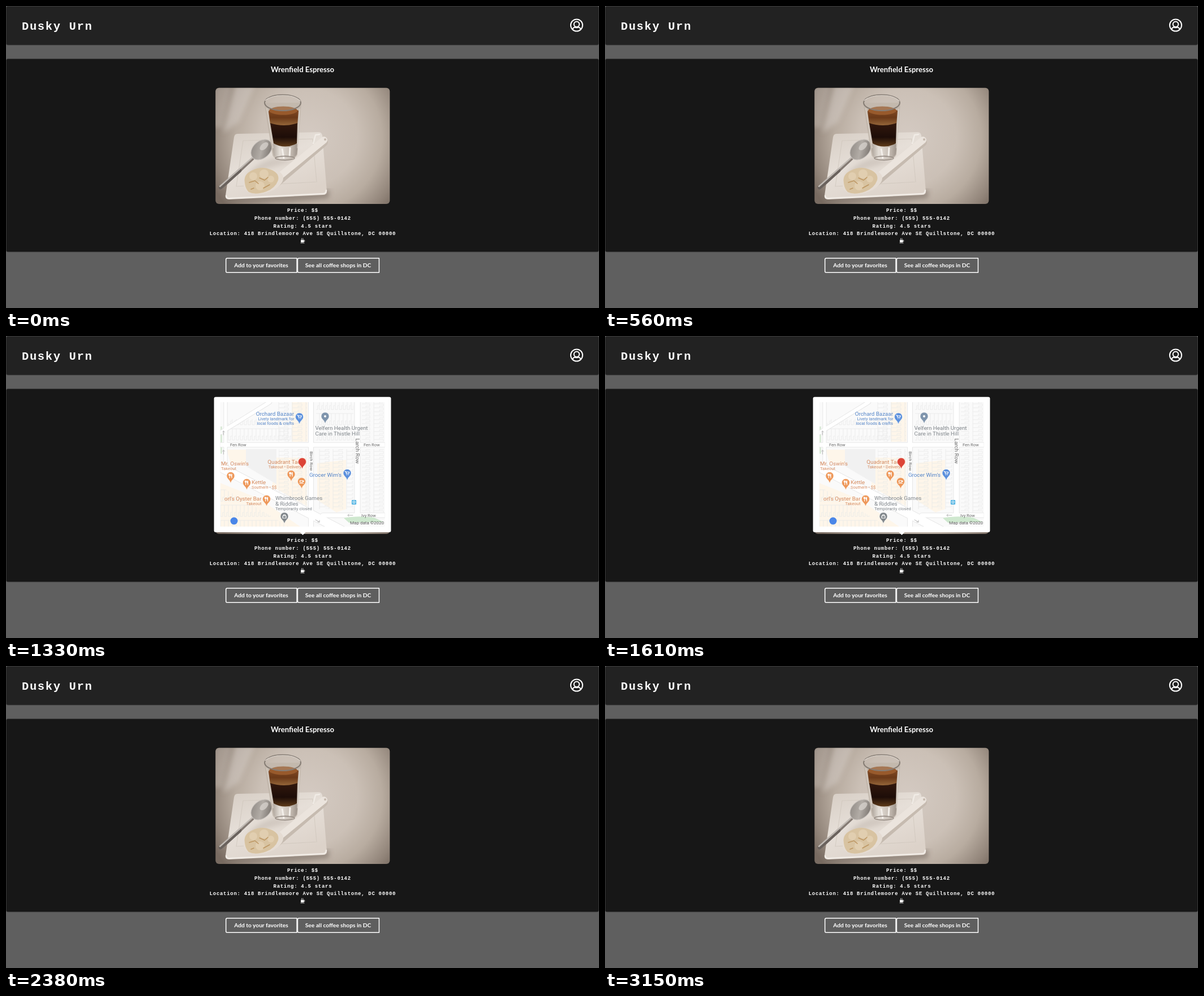
Animation, 1048 px wide and 534 px high, one loop 3360 ms. Source, as an HTML page:

```html
<!DOCTYPE html>
<html lang="en">
<head>
<meta charset="utf-8">
<title>Coffee shop card</title>
<style>
  html, body { margin: 0; width: 100%; height: 100%; overflow: hidden; background: #5f5f5f; }
  svg { display: block; width: 1048px; height: 534px; }
  .mono { font-family: "Liberation Mono", monospace; font-weight: 700; letter-spacing: .087em; fill: #fff; }
  .lato { font-family: Lato, sans-serif; font-weight: 700; fill: #fff; text-anchor: middle; }
  .map { font-family: Roboto, sans-serif; }
  .line { fill: none; stroke-linecap: round; stroke-linejoin: round; }
  #popup { opacity: 0; }
</style>
</head>
<body>
<svg viewBox="0 0 1048 534">
  <defs>
    <radialGradient id="table" gradientUnits="userSpaceOnUse" cx="535" cy="232" r="190">
      <stop offset="0" stop-color="#d4cac2"/><stop offset=".45" stop-color="#cbc0b6"/>
      <stop offset=".68" stop-color="#b8aca0"/><stop offset=".88" stop-color="#93867b"/><stop offset="1" stop-color="#786b61"/>
    </radialGradient>
    <linearGradient id="plate" x1="0" y1="0" x2=".6" y2="1">
      <stop offset="0" stop-color="#d6cdc4"/><stop offset=".5" stop-color="#e6dfd8"/><stop offset="1" stop-color="#dcd2c9"/>
    </linearGradient>
    <linearGradient id="foam" x1="0" y1="0" x2="0" y2="1">
      <stop offset="0" stop-color="#8a5027"/><stop offset=".55" stop-color="#6b3918"/><stop offset="1" stop-color="#9a6c3e"/>
    </linearGradient>
    <linearGradient id="brew" x1="0" y1="0" x2="0" y2="1">
      <stop offset="0" stop-color="#32180d"/><stop offset=".6" stop-color="#1d0d08"/><stop offset="1" stop-color="#5e3b1a"/>
    </linearGradient>
    <linearGradient id="base" x1="0" y1="0" x2="1" y2="0">
      <stop offset="0" stop-color="#a79d93"/><stop offset=".3" stop-color="#e4ded7"/>
      <stop offset=".7" stop-color="#c7beb5"/><stop offset="1" stop-color="#9a9087"/>
    </linearGradient>
    <linearGradient id="steel" x1="0" y1="0" x2="1" y2="1">
      <stop offset="0" stop-color="#8a847f"/><stop offset=".5" stop-color="#b2aca6"/><stop offset="1" stop-color="#6b6560"/>
    </linearGradient>
    <filter id="soft"><feGaussianBlur stdDeviation="4"/></filter>
    <clipPath id="frame"><rect x="370.3" y="144.7" width="308" height="205.3" rx="6"/></clipPath>
    <clipPath id="mapBox"><rect x="378.5" y="117" width="291" height="220"/></clipPath>
    <pattern id="lots" width="7" height="27" patternUnits="userSpaceOnUse">
      <path d="M0 2H7M1 2V22H5V15H7" fill="none" stroke="#e9e9e9" stroke-width=".8"/>
    </pattern>
    <pattern id="lotsWide" width="24" height="7" patternUnits="userSpaceOnUse">
      <path d="M2 0V7M2 1H19V5H12V7" fill="none" stroke="#e9e9e9" stroke-width=".8"/>
    </pattern>
  </defs>

  <rect width="1048" height="534" fill="#5f5f5f"/>
  <g stroke="#3d3d3d" stroke-width=".7">
    <rect x=".4" y=".4" width="1047.2" height="68.6" rx="3" fill="#222"/>
    <rect x=".4" y="93.4" width="1047.2" height="341.4" rx="3" fill="#171717"/>
  </g>
  <text class="mono" x="28" y="41.7" font-size="20.3">Dusky Urn</text>
  <g class="line" stroke="#fff" stroke-width="2">
    <circle cx="1008.5" cy="34" r="10.5"/>
    <circle cx="1008.5" cy="32.3" r="4.8"/>
    <path d="M1001.4 41Q1002.6 38 1005.4 37.6Q1008.5 39 1011.6 37.6Q1014.4 38 1015.6 41"/>
  </g>
  <text id="title" class="lato" x="524" y="117" font-size="13.1">Wrenfield Espresso</text>

  <g clip-path="url(#frame)">
    <rect x="370" y="144" width="309" height="207" fill="url(#table)"/>
    <path d="M366 140H400L384 215H366Z" fill="#bdb3aa" opacity=".55" filter="url(#soft)"/>
    <path d="M405 140H440L412 205L384 225Z" fill="#d0c8c1" opacity=".6" filter="url(#soft)"/>
    <path d="M384 335L392 346Q480 352 570 340L572 325Z" fill="#7b6f66" opacity=".6" filter="url(#soft)"/>
    <path d="M409 226L553 223Q558 223 559 229L567 328Q567 334 560 334L395 342Q387 342 388 335L403 232Q404 226 409 226Z" fill="url(#plate)"/>
    <path class="line" d="M389 336Q390 341 396 340L560 332Q566 332 566 326" stroke="#f1ece6" stroke-width="2.5"/>
    <path class="line" d="M419 238L542 235L549 311L407 319Z" stroke="#cfc6bd" stroke-width="1.2" opacity=".7"/>
    <path d="M473 268Q440 278 425 300Q470 285 512 273Z" fill="#b9aea4" opacity=".45" filter="url(#soft)"/>

    <path class="line" d="M478 313L562 241" stroke="#c6bbb0" stroke-width="14"/>
    <path class="line" d="M474 309L562 237" stroke="#ebe4dd" stroke-width="12"/>
    <ellipse cx="455" cy="311" rx="36" ry="20" transform="rotate(-16 455 311)" fill="#e5dcd3"/>
    <path class="line" d="M543 243L547 228L554 227" stroke="#f1ece6" stroke-width="2.4"/>
    <circle cx="564" cy="236" r="2" fill="#c5b9ad"/>
    <path d="M422 313Q419 298 434 291Q452 282 467 289Q484 295 481 308Q476 322 460 328Q441 335 429 329Q423 323 422 313Z" fill="#d8c3a1"/>
    <g fill="#e1ceb0"><circle cx="437" cy="301" r="7"/><circle cx="456" cy="297" r="8"/><circle cx="468" cy="306" r="6"/><circle cx="449" cy="318" r="8"/></g>
    <path class="line" d="M430 312L440 309L446 314M448 304L457 308L463 303M455 322L466 316M433 324L438 322" stroke="#bd9764" stroke-width="1.6"/>

    <path class="line" d="M441 266L380 323" stroke="#857b74" stroke-width="4"/>
    <path class="line" d="M413 291L379 321" stroke="#6a625d" stroke-width="6.5"/>
    <path class="line" d="M439 265L378 319" stroke="#c0bab4" stroke-width="2.4"/>
    <ellipse cx="451.5" cy="254" rx="21" ry="15" transform="rotate(-42 451.5 254)" fill="url(#steel)" stroke="#c9c3be"/>
    <ellipse cx="456" cy="248" rx="9" ry="5" transform="rotate(-42 456 248)" fill="#d5d0cb" opacity=".8"/>

    <path d="M456 171L471 264Q476 273 493 273Q511 272 515 263L522 171Z" fill="#bfb4a9" opacity=".75"/>
    <path d="M470 244L473 264Q478 272 493 272Q510 271 514 262L516 244Z" fill="url(#base)"/>
    <path d="M464 186Q488 171 517 185L515 210Q491 216 467 209Z" fill="url(#foam)"/>
    <ellipse cx="490" cy="185" rx="25" ry="7.5" fill="#985a2c"/>
    <path d="M467 207Q491 215 515 207L514 243Q493 254 473 243Z" fill="url(#brew)"/>
    <path d="M488 252L491 270M502 250L501 267" stroke="#f3efea" stroke-width="3"/>
    <ellipse cx="493" cy="269" rx="17" ry="3.5" fill="none" stroke="#8f857d" stroke-width="1.3"/>
    <ellipse cx="489" cy="171" rx="32" ry="14" fill="#c2b8ae" fill-opacity=".3" stroke="#857c74" stroke-width="2"/>
    <path class="line" d="M458 167Q469 158 489 158Q511 158 520 168M461 181L472 251M519 182L515 251" stroke="#ddd5cd" stroke-width="1.2"/>
  </g>

  <g id="facts" class="mono" font-size="8.9" text-anchor="middle"></g>
  <g transform="translate(520 410.5)">
    <path d="M1 3H6.5V6.5Q6.5 7.5 5.5 7.5H2Q1 7.5 1 6.5ZM0 8.2H8L7 9H1Z" fill="#fff"/>
    <path class="line" d="M6.5 3.7H7.5Q8.4 5 7.5 6H6.5M2.5 .4V2M4.8 .4V2" stroke="#fff" stroke-width=".8"/>
  </g>
  <g class="line" stroke="#fff" stroke-width="1.5">
    <path d="M514 445.9H391Q388.7 445.9 388.7 448.2V468.9Q388.7 471.2 391 471.2H514Z"/>
    <path d="M659.4 445.9H517.7Q515.4 445.9 515.4 448.2V468.9Q515.4 471.2 517.7 471.2H659.4Z"/>
  </g>
  <g class="lato" font-size="10.2">
    <text x="451" y="461.8">Add to your favorites</text>
    <text x="587" y="461.8">See all coffee shops in DC</text>
  </g>

  <g id="popup">
    <path d="M519 346.5L524.5 352L530 346.5Z" fill="#fff"/>
    <rect x="367.6" y="107.8" width="312.8" height="239.2" rx="3" fill="#fff"/>
    <g clip-path="url(#mapBox)">
      <rect x="378" y="117" width="292" height="220" fill="#fafafa"/>
      <g fill="#fef6ea">
        <path d="M505 117H533V187H505ZM550 225L601 219V306L584 312L550 290ZM390 201H466L458 232L396 222ZM478 215H532V301L470 266Z"/>
        <path d="M379 260L448 288L520 337H379Z"/>
      </g>
      <path d="M424 200H478V262L424 230Z" fill="#f1f1f1"/>
      <path d="M400 147H505V187H388V158ZM548 117H614V187H548ZM379 266L500 337H379Z" fill="url(#lots)"/>
      <path d="M629 117H670V187H629ZM629 200H670V312H629ZM548 200H614V306H548ZM480 117H532V187H480ZM482 200H532V300H482Z" fill="url(#lotsWide)"/>
      <path d="M379 160H382V208H379Z" fill="#dcebd9"/>
      <g id="roads" class="line"></g>
      <path d="M597 322Q620 317 650 321L668 329L606 330Z" fill="#cfe8cf"/>
    </g>
    <g id="labels" class="map"></g>
    <g id="pins"></g>
    <rect x="611" y="290" width="8" height="8" rx="1" fill="#45aee0"/>
    <path d="M613 292H617V295H613ZM613 296.5H614M616 296.5H617" fill="none" stroke="#fff"/>
    <circle cx="403" cy="327" r="6.5" fill="#4a86e8"/>
  </g>
</svg>
<script>
const LOOP = 3360, OPEN = 1330, CLOSE = 2380;
const $ = id => document.getElementById(id);

function add(parent, tag, attrs, text) {
  const el = document.createElementNS('http://www.w3.org/2000/svg', tag);
  for (const k in attrs) el.setAttribute(k, attrs[k]);
  if (text) el.textContent = text;
  parent.append(el);
  return el;
}

[
  'Price: $$',
  'Phone number: (555) 555-0142',
  'Rating: 4.5 stars',
  'Location: 418 Brindlemoore Ave SE Quillstone, DC 00000'
].forEach((line, i) => add($('facts'), 'text', { x: 524.4, y: 364 + i * 13.8 }, line));

const roads = [
  ['M379 171L466 117', 8], ['M388 117V230', 7], ['M379 192.5H670', 9], ['M539 117V337', 10],
  ['M621 117V320', 11], ['M379 232L594 344', 17], ['M560 317H670', 9]
];
for (const [edge, shrink] of [['#e2e2e2', 0], ['#fff', 1.6]])
  for (const [d, w] of roads) add($('roads'), 'path', { d, stroke: edge, 'stroke-width': w - shrink });
for (const d of ['M384.5 175V168M382.5 170L384.5 168L386.5 170', 'M384.5 209V202M382.5 204L384.5 202L386.5 204',
  'M613 317H604M606 315L604 317L606 319', 'M547 325L554 329M554 326V329H551'])
  add($('roads'), 'path', { d, stroke: '#b5b5b5' });

const BLUE = '#5a8fdc', NAVY = '#5485c9', ORANGE = '#ee9758', RUST = '#d58b60', GRAY = '#80868b', INK = '#666';

// x, baseline, size, colour, text, anchor
[
  [509, 140.5, 9.8, NAVY, 'Orchard Bazaar', 'end'],
  [509.5, 149, 7.6, NAVY, 'Lively landmark for', 'end'],
  [509, 157, 7.6, NAVY, 'local foods & crafts', 'end'],
  [546.5, 165.5, 9.8, GRAY, 'Velfern Health Urgent'],
  [546.5, 175.5, 9.8, GRAY, 'Care in Thistle Hill'],
  [396, 195.3, 7.5, INK, 'Fen Row'],
  [632, 195.3, 7.5, INK, 'Fen Row'],
  [628, 320.3, 7.5, INK, 'Ivy Row'],
  [380, 228.5, 9.8, RUST, "Mr. Oswin's"],
  [380, 236.5, 7.6, RUST, 'Takeout'],
  [526, 226, 9.8, RUST, 'Quadrant Taco', 'end'],
  [522, 233.5, 7.4, RUST, 'Takeout • Delivery', 'end'],
  [593, 249, 9.8, NAVY, "Grocer Wim's", 'end'],
  [434, 262, 9.8, RUST, 'Kettle'],
  [434, 270, 7.4, RUST, 'Southern • $$'],
  [451.5, 290.5, 9.8, RUST, "orl's Oyster Bar", 'end'],
  [451.5, 299, 7.6, RUST, 'Takeout', 'end'],
  [476, 290, 9.8, GRAY, 'Whimbrook Games'],
  [476, 299.8, 9.8, GRAY, '& Riddles'],
  [476, 307.8, 7.7, GRAY, 'Temporarily closed'],
  [668, 332.5, 8, '#555', 'Map data ©2020', 'end']
].forEach(([x, y, size, fill, text, anchor = 'start']) =>
  add($('labels'), 'text', { x, y, fill, 'font-size': size, 'text-anchor': anchor }, text));

[[536.5, 204, 7.7, 'Birch Row'], [618, 181, 9.6, 'Larch Row']].forEach(([x, y, size, text]) =>
  add($('labels'), 'text', { transform: `translate(${x} ${y}) rotate(90)`, 'font-size': size, fill: INK }, text));

const icons = {
  cart: 'M-4 -3H-2.5L-1.3 1H2.7L3.7 -2H-2M-1 3H-.5M2 3H2.5',
  fork: 'M-1.8 -3.5V3.5M-3 -3.5V-1H-.6V-3.5M2 3.5V-3.5Q.6 -2 1 .5H2',
  cup: 'M-3 -2H2V1H-3ZM2 -1.5H3.5V0H2M-3.5 3H3',
  bag: 'M-3 -1H3V3H-3ZM-1.5 -1V-3H1.5V-1',
  dot: 'M-.8 0A.8 .8 0 1 0 .8 0A.8 .8 0 1 0 -.8 0'
};
[
  [518.5, 143, BLUE, 'cart'], [564, 142, '#7f95ad', 'dot'], [603, 242.5, BLUE, 'cart'],
  [397, 247.5, ORANGE, 'fork'], [425.5, 259.5, ORANGE, 'fork'], [504, 244.5, ORANGE, 'fork'],
  [522.5, 257.5, ORANGE, 'cup'], [460.5, 288.5, ORANGE, 'fork'], [492, 319, GRAY, 'bag'],
  [523.5, 222.5, '#dc4437']
].forEach(([x, y, fill, icon]) => {
  const g = add($('pins'), 'g', { transform: `translate(${x} ${y})` });
  add(g, 'path', { d: 'M0 12.5Q-1.3 8 -4.6 5.2A7 7 0 1 1 4.6 5.2Q1.3 8 0 12.5Z', fill, stroke: '#fff', 'stroke-width': .5 });
  if (icon) add(g, 'path', { d: icons[icon], class: 'line', stroke: '#fff', 'stroke-width': icon === 'dot' ? 2.4 : 1.2 });
});

// Hard switch between the closed and the open state
function toggle(el, closed, open) {
  const steps = [[closed, 0], [open, OPEN], [closed, CLOSE], [closed, LOOP]];
  el.animate(
    steps.map(([opacity, ms]) => ({ opacity, offset: ms / LOOP, easing: 'step-end' })),
    { duration: LOOP, iterations: Infinity }
  ).startTime = 0;
}
toggle($('popup'), 0, 1);
toggle($('title'), 1, 0);
</script>
</body>
</html>
```
